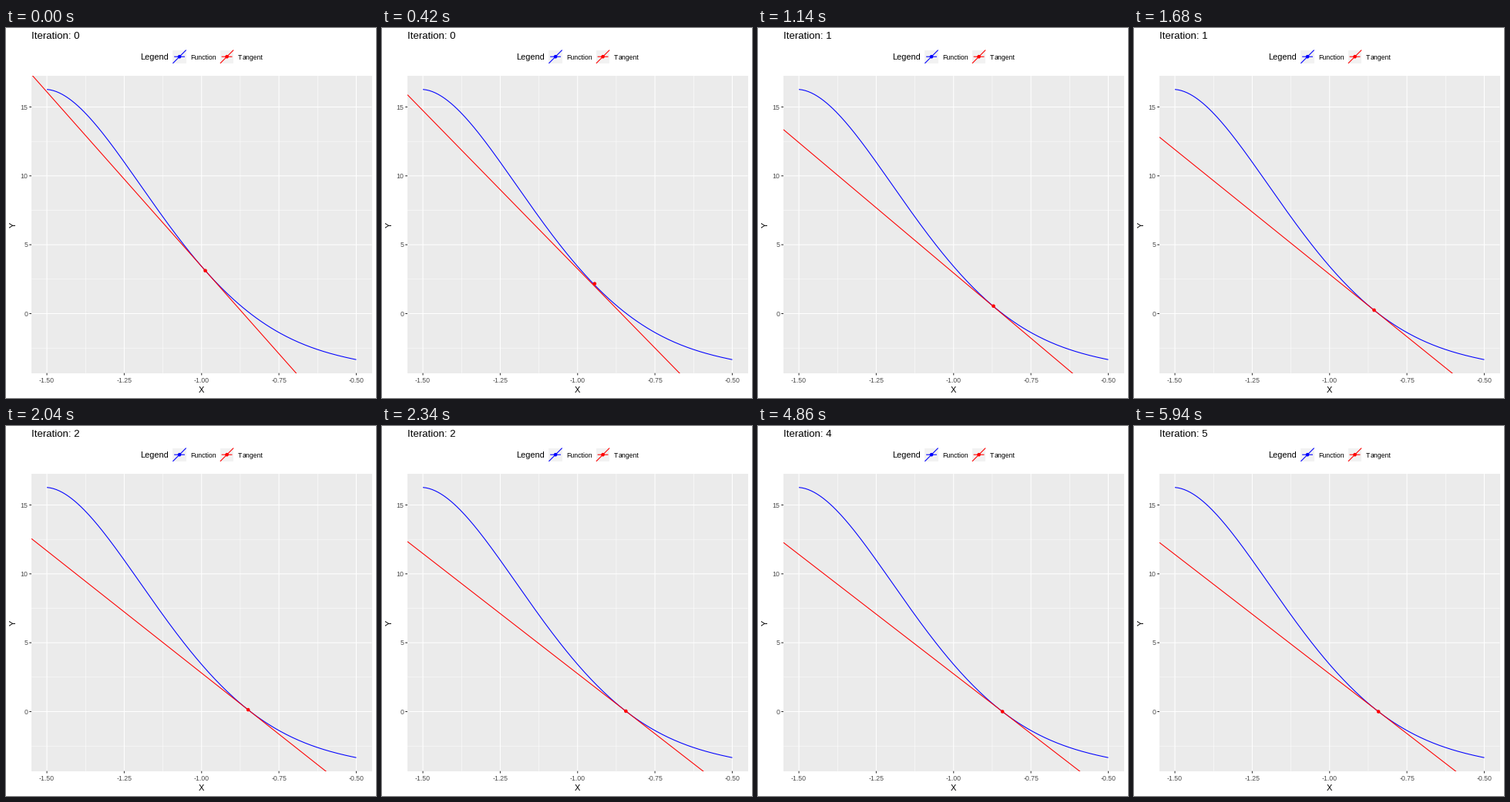
Recreate the animation shown at these times as a matplotlib script. Size 480 by 480 pixels, loop 6000 ms.

```python
import numpy as np
import matplotlib.pyplot as plt
from matplotlib.animation import FuncAnimation
from matplotlib.patches import Circle, Rectangle

SIZE, DPI = 480, 72
FRAMES, STEP_MS, STEPS = 100, 60, 5

# Panel edges and data scale, in pixels
LEFT, RIGHT, TOP, BOTTOM = 33, 474.5, 62.05, 447.7
X_UNIT, Y_UNIT, Y_ZERO = 401.36, 17.87, 370.5
LINE_W = 1.07

plt.rcParams["font.family"] = "Liberation Sans"

curve = np.poly1d([-6.83, -10.589, -1.554, -19.15, -26.21, -15.18, -6.90])
slope_at = curve.deriv()


def px(x):
    return (LEFT + RIGHT) / 2 + (x + 1) * X_UNIT


def py(y):
    return Y_ZERO - y * Y_UNIT


def newton_states(x):
    """Rows of x, y, slope and intercept, one for each iteration."""
    rows = []
    for _ in range(STEPS + 1):
        y, slope = curve(x), slope_at(x)
        rows.append((x, y, slope, y - slope * x))
        x -= y / slope
    return np.array(rows)


states = newton_states(-0.988)
keys = np.round((FRAMES - 1) * np.arange(STEPS + 1) / STEPS)

fig = plt.figure(figsize=(SIZE / DPI, SIZE / DPI), dpi=DPI, facecolor="white")
ax = fig.add_axes([0, 0, 1, 1])
ax.set_xlim(0, SIZE)
ax.set_ylim(SIZE, 0)
ax.axis("off")

panel = Rectangle((LEFT, TOP), RIGHT - LEFT, BOTTOM - TOP, fc="#EBEBEB", lw=0, zorder=0)
ax.add_patch(panel)


def line(xs, ys, color, width=LINE_W, z=3):
    return ax.plot(xs, ys, color=color, lw=width, zorder=z, snap=False,
                   solid_capstyle="butt")[0]


def dot(x, y, color, z=4):
    return ax.add_patch(Circle((x, y), 2.3, fc=color, lw=0, zorder=z))


def label(x, y, text, size, color="black", **kw):
    return ax.text(x, y, text, fontsize=size, color=color, va="baseline", **kw)


def grid_x(x, width):
    line([px(x)] * 2, [TOP, BOTTOM], "white", width, 1)


def grid_y(y, width):
    line([LEFT, RIGHT], [py(y)] * 2, "white", width, 1)


def legend_key(x, color):
    side, mid = 17.28, 37.2
    top = mid - side / 2
    ax.add_patch(Rectangle((x, top), side, side, fc="#F2F2F2", lw=0, zorder=1))
    line([x + 0.1 * side, x + 0.9 * side], [mid, mid], color)
    line([x, x + side], [top + side, top], color)
    dot(x + side / 2, mid, color)


# Grid, ticks and tick labels
for x in (-1.375, -1.125, -0.875, -0.625):
    grid_x(x, LINE_W / 2)
for y in (-2.5, 2.5, 7.5, 12.5):
    grid_y(y, LINE_W / 2)
for x in (-1.5, -1.25, -1.0, -0.75, -0.5):
    grid_x(x, LINE_W)
    line([px(x)] * 2, [BOTTOM, BOTTOM + 2.75], "#333333")
    label(px(x), 460, f"{x:.2f}", 8.8, "#4D4D4D", ha="center")
for y in (0, 5, 10, 15):
    grid_y(y, LINE_W)
    line([LEFT - 2.75, LEFT], [py(y)] * 2, "#333333")
    label(28.2, py(y) + 3.2, str(y), 8.8, "#4D4D4D", ha="right")

label(px(-1), 473, "X", 11, ha="center")
ax.text(9.3, 255, "Y", fontsize=11, rotation=90, ha="center", va="center")

# Legend; the capital T is set apart to avoid kerning
label(174.4, 41, "Legend", 11)
legend_key(216.4, "blue")
label(239, 41, "Function", 8.8)
legend_key(277.9, "red")
label(301, 41, "T", 8.8)
label(306.4, 41, "angent", 8.8)

xs = np.linspace(-1.5, -0.5, 200)
line(px(xs), py(curve(xs)), "blue")

title = label(33, 14, "", 13.2)
point = dot(0, 0, "red")
tangent = line([], [], "red", z=5)
tangent.set_clip_path(panel)
ends = np.array([-1.55, -0.45])


def update(i):
    x, y, slope, intercept = (np.interp(i, keys, col) for col in states.T)
    point.center = px(x), py(y)
    tangent.set_data(px(ends), py(intercept + slope * ends))
    title.set_text(f"Iteration: {round(STEPS * i / (FRAMES - 1))}")
    return point, tangent, title


anim = FuncAnimation(fig, update, frames=FRAMES, interval=STEP_MS,
                     repeat=True, repeat_delay=0, blit=False)
plt.show()
```
